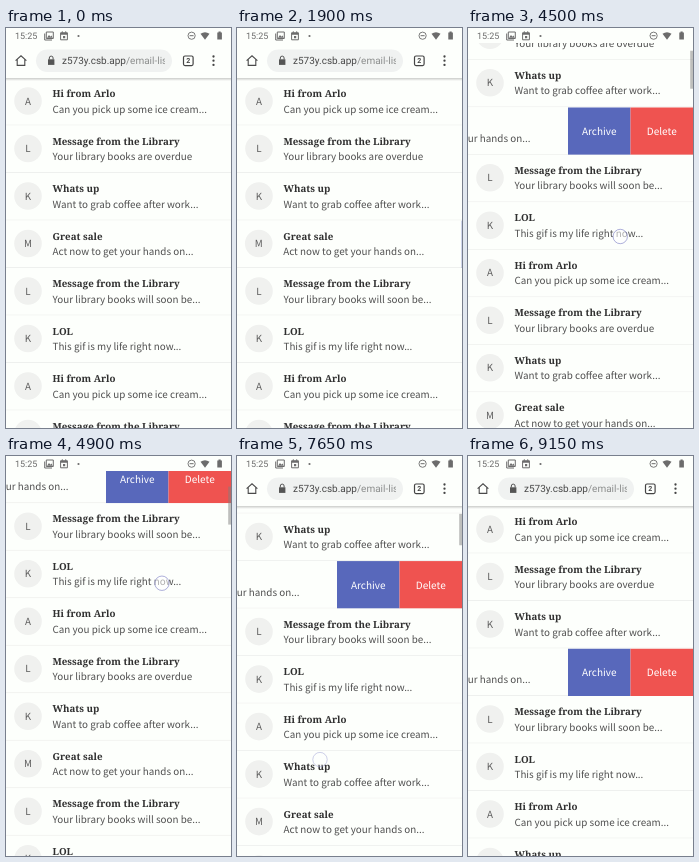
Animation of 225x400 px, one loop 9200 ms. Source, as an HTML page with a canvas:

```html
<!DOCTYPE html>
<html lang="en">
<head>
<meta charset="utf-8">
<title>Swipeable mail list</title>
<style>
  html, body { margin: 0; width: 100%; height: 100%; overflow: hidden; background: #fdfffc; }
  canvas { display: block; width: 100vw; height: 100vh; }
</style>
</head>
<body>
<canvas id="stage"></canvas>
<script>
const W = 225, H = 400, LOOP = 9200;
const ROW = 47.5, LIST_TOP = 50, BAR = 35, ACTION = 62.5;
const PAGE_HEIGHT = 3900, MAX_SCROLL = 194;
const SALE = 3, REMOVED = 7;
const PAPER = '#fdfffc', GREY = '#6c6c6c';
const SANS = '"Noto Sans CJK SC", "Noto Sans CJK JP", "Noto Sans CJK", "Open Sans", sans-serif';
const SERIF = '"Noto Serif", serif';
const UI = 'Roboto, sans-serif';
const MAILS = [
  ['A', 'Hi from Arlo', 'Can you pick up some ice cream...'],
  ['L', 'Message from the Library', 'Your library books are overdue'],
  ['K', 'Whats up', 'Want to grab coffee after work...'],
  ['M', 'Great sale', 'Act now to get your hands on...'],
  ['L', 'Message from the Library', 'Your library books will soon be...'],
  ['K', 'LOL', 'This gif is my life right now...']
];

const canvas = document.getElementById('stage');
const ctx = canvas.getContext('2d');

const ramp = (t, a, b) => Math.min(1, Math.max(0, (t - a) / (b - a)));
const smooth = p => p * p * (3 - 2 * p);
const ease = (t, a, b) => smooth(ramp(t, a, b));
const mix = (a, b, p) => a + (b - a) * p;

function text(str, x, y, font, color, align = 'left') {
  ctx.font = font;
  ctx.fillStyle = color;
  ctx.textAlign = align;
  ctx.fillText(str, x, y);
}

function rect(x, y, w, h, color) {
  ctx.fillStyle = color;
  ctx.fillRect(x, y, w, h);
}

function disc(x, y, r, color) {
  ctx.fillStyle = color;
  ctx.beginPath();
  ctx.arc(x, y, r, 0, 2 * Math.PI);
  ctx.fill();
}

function pill(x, y, w, h, r) {
  ctx.beginPath();
  ctx.roundRect(x, y, w, h, r);
}

function path(d, color, lineWidth) {
  const shape = new Path2D(d);
  if (lineWidth) {
    ctx.strokeStyle = color;
    ctx.lineWidth = lineWidth;
    ctx.stroke(shape);
  } else {
    ctx.fillStyle = color;
    ctx.fill(shape);
  }
}

function clipped(x, y, w, h, draw) {
  ctx.save();
  ctx.beginPath();
  ctx.rect(x, y, w, h);
  ctx.clip();
  draw();
  ctx.restore();
}

// How far the page has moved up, toolbar travel included.
function pageShift(t) {
  const up = smooth(ramp(t, 4050, 4950) ** 0.85);
  const down = smooth(ramp(t, 7250, 8550) ** 0.535);
  return MAX_SCROLL * (up - down);
}

function toolbarHidden(t, shift) {
  return t < 7250 ? Math.min(BAR, shift) : Math.max(0, shift - MAX_SCROLL + BAR);
}

function rowSwipe(index, t) {
  if (index === SALE) {
    return 2 * ACTION * (ease(t, 450, 1250) - ease(t, 1400, 1915) + ease(t, 2250, 2950));
  }
  return index === REMOVED ? 2 * ACTION * ease(t, 5300, 6050) : 0;
}

function drawAction(label, x, y, color) {
  rect(x, y, ACTION, ROW, color);
  text(label, x + ACTION / 2, y + 27.7, '500 10px ' + SANS, '#fff', 'center');
}

function drawRow([initial, title, body], y, swipe, height) {
  clipped(0, y, W, height, () => {
    const x = -swipe;
    disc(x + 22, y + 23, 13.8, '#f0f1ef');
    text(initial, x + 22, y + 26.6, '9.8px ' + SANS, '#5c5c5c', 'center');
    text(title, x + 46.5, y + 19, 'bold 9.75px ' + SERIF, '#303030');
    text(body, x + 46.5, y + 34.6, '9.85px ' + SANS, '#505050');
    rect(0, y + ROW - 0.8, W, 0.8, '#ecedeb');
    if (swipe > 0) {
      drawAction('Archive', W - swipe, y, '#5868bb');
      drawAction('Delete', W - swipe + ACTION, y, '#ef5350');
    }
  });
}

function drawList(t, shift) {
  const collapse = ease(t, 6250, 6500);
  let y = LIST_TOP - shift;
  for (let i = 0; y < H; i++) {
    const height = i === REMOVED ? ROW * (1 - collapse) : ROW;
    if (y + height > 0) drawRow(MAILS[i % MAILS.length], y, rowSwipe(i, t), height);
    y += height;
  }
}

function drawScrollbar(t, shift, hidden) {
  const alpha = t < 7250
    ? ramp(t, 4050, 4100) - ramp(t, 5300, 5600)
    : ramp(t, 7250, 7300) - ramp(t, 8750, 9150);
  if (alpha <= 0) return;
  const top = LIST_TOP - hidden, view = H - top, scale = view / PAGE_HEIGHT;
  ctx.globalAlpha = alpha;
  rect(222.2, top + (shift - hidden) * scale, 2.8, view * scale, 'rgba(128,128,128,0.5)');
  ctx.globalAlpha = 1;
}

function drawToolbar(hidden) {
  if (hidden >= BAR) return;
  ctx.save();
  ctx.translate(0, -hidden);
  rect(0, 15, W, BAR, PAPER);
  const shadow = ctx.createLinearGradient(0, 50, 0, 53);
  shadow.addColorStop(0, 'rgba(0,0,0,0.2)');
  shadow.addColorStop(1, 'rgba(0,0,0,0)');
  rect(0, 50, W, 3, shadow);
  path('M9.6 32.6 L15 27.8 L20.4 32.6 M11.2 31.4 V37.4 H18.8 V31.4', '#4a4a4a', 1.1);
  pill(30, 21.5, 136, 22.5, 11.25);
  ctx.fillStyle = '#f0f2f1';
  ctx.fill();
  path('M42 31.3 h6.4 v5.6 h-6.4 z', '#555');
  path('M43.3 31.5 V30 a1.9 1.9 0 0 1 3.8 0 V31.5', '#555', 1);
  clipped(54, 22, 105, 22, () => {
    const host = 'z573y.csb.app', font = '10px ' + UI;
    text(host, 56, 36.2, font, '#484848');
    const hostWidth = ctx.measureText(host).width;
    text('/email-list', 56 + hostWidth, 36.2, font, '#8c8e8d');
  });
  pill(177.5, 28, 9.6, 9.6, 1.5);
  ctx.strokeStyle = '#444';
  ctx.lineWidth = 1.2;
  ctx.stroke();
  text('2', 182.3, 35.4, 'bold 7px ' + UI, '#444', 'center');
  for (const y of [28.5, 32.7, 36.9]) disc(207.5, y, 1.15, '#444');
  ctx.restore();
}

function drawStatusBar() {
  rect(0, 0, W, 15, PAPER);
  text('15:25', 9, 11, '9px ' + UI, GREY);
  path('M40.3 4 h7 v6.5 h-7 z M38.7 5.5 V12 H46', GREY, 1);
  path('M41 9.8 l2 -2.8 l1.4 1.7 l1 -1.1 l1.4 2.2 z', GREY);
  path('M54.6 4.8 h6.8 v7 h-6.8 z M56.3 3.3 v1.5 M59.7 3.3 v1.5', GREY, 1);
  path('M54.6 4.8 h6.8 v1.9 h-6.8 z M57 8 h2.2 v2.2 h-2.2 z', GREY);
  disc(72.5, 8, 1.1, GREY);
  ctx.beginPath();
  ctx.arc(185.6, 7.7, 3.6, 0, 2 * Math.PI);
  ctx.strokeStyle = GREY;
  ctx.lineWidth = 0.9;
  ctx.stroke();
  path('M183.6 7.7 h4', GREY, 1);
  path('M194.5 5.8 Q199 2.6 203.5 5.8 L199 11.7 z', GREY);
  path('M211.3 4.6 h1.2 v-1 h2.2 v1 h1.2 v7 h-4.6 z', GREY);
}

function touch(t, start, end, x, y) {
  if (t < start || t >= end + 100) return;
  ctx.globalAlpha = 1 - ramp(t, end, end + 100);
  disc(x, y, 7.2, 'rgba(255,255,255,0.55)');
  ctx.strokeStyle = 'rgba(120,122,195,0.6)';
  ctx.lineWidth = 1;
  ctx.stroke();
  ctx.globalAlpha = 1;
}

function drawTouches(t, shift) {
  const saleX = 186 - rowSwipe(SALE, t);
  touch(t, 450, 1150, saleX, 217);
  touch(t, 1400, 1780, saleX, 217);
  touch(t, 2250, 2850, saleX, 217);
  const drag = shift / MAX_SCROLL;
  touch(t, 4050, 5000, mix(147, 156, drag), 324 - 198 * drag);
  touch(t, 5300, 5950, 186 - rowSwipe(REMOVED, t), 213);
  touch(t, 6250, 6350, 194, 213);
  touch(t, 7250, 7610, 83, 391 - shift);
}

function render() {
  const t = performance.now() % LOOP;
  const ratio = window.devicePixelRatio || 1;
  const width = Math.round(innerWidth * ratio), height = Math.round(innerHeight * ratio);
  if (canvas.width !== width || canvas.height !== height) {
    canvas.width = width;
    canvas.height = height;
  }
  ctx.setTransform(width / W, 0, 0, height / H, 0, 0);
  ctx.textRendering = 'geometricPrecision';
  rect(0, 0, W, H, PAPER);

  const shift = pageShift(t), hidden = toolbarHidden(t, shift);
  drawList(t, shift);
  drawScrollbar(t, shift, hidden);
  drawToolbar(hidden);
  drawStatusBar();
  drawTouches(t, shift);
  requestAnimationFrame(render);
}
render();
</script>
</body>
</html>
```
